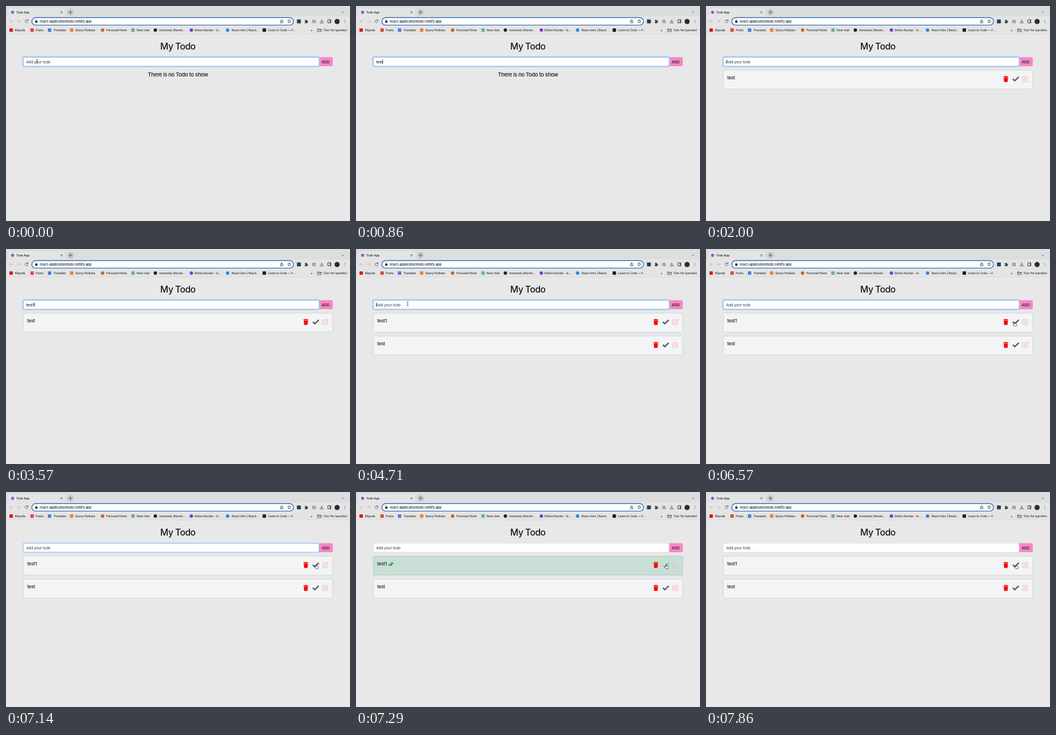
An HTML page for the animation above (8 s loop, 600 by 375 pixels).

```html
<!DOCTYPE html>
<html lang="en">
<head>
<meta charset="utf-8">
<title>Todo App</title>
<style>
html, body { margin: 0; width: 100%; height: 100%; overflow: hidden; background: #e8e8e8; }
svg { display: block; width: 600px; height: 375px; font-family: Inter, Roboto, sans-serif; fill: #14171a; }
text { white-space: pre; }
.mark { font-size: 4.95px; font-weight: 500; fill: #222427; }
.field { font-size: 6.3px; font-weight: 500; }
.line { fill: none; stroke: #3f4347; stroke-width: .8; stroke-linecap: round; stroke-linejoin: round; }
.item { font-size: 7.9px; font-weight: 500; letter-spacing: -.13px; }
</style>
</head>
<body>
<svg viewBox="0 0 600 375">
  <defs>
    <g id="trash" fill="#f50808">
      <path d="M518.8 122.8h2.4l.6-.9h2.4l.6.9h2.4v1.4h-8.4z"/>
      <path d="M519.4 124.8h7.2l-.4 6.4q-.1 1.2-1.2 1.2h-4q-1.1 0-1.2-1.2z"/>
    </g>
    <path id="tick" d="M535.1 127.1l3.5 3.2 6.9-6.6" fill="none" stroke="#5a5d60" stroke-width="2.4"/>
    <g id="pencil" fill="none" stroke="#f6a9bb" stroke-width="1" stroke-linejoin="round">
      <path d="M557 123.3h-3.4q-1.3 0-1.3 1.3v6q0 1.3 1.3 1.3h6q1.3 0 1.3-1.3v-3.2"/>
      <path d="M555.4 128.9l.4-2 4.5-4.4 1.5 1.5-4.4 4.5z"/>
    </g>
    <g id="twin" fill="none" stroke-linejoin="round">
      <path d="M0 4.2l2 2.4 5-6.3M3.4 5.6l1 1.3 5-6.3"/>
    </g>
  </defs>

  <!-- browser frame -->
  <path d="M0 0h600v18H0z" fill="#dcdddf"/>
  <path d="M0 18h600v31H0zM2 18q2 0 2-2V7q0-3 3-3h93q3 0 3 3v9q0 2 2 2z" fill="#e4e4e5"/>
  <path d="M0 49h600" stroke="#d6d6d7" stroke-width=".6"/>
  <circle cx="11.5" cy="11" r="2.7" fill="#8b5cd6"/>
  <text x="18" y="12.9" font-size="5" font-weight="500">Todo App</text>
  <circle cx="112.5" cy="11" r="5.8" fill="#c6c7ca"/>
  <g class="line">
    <path d="M95.2 9.5l3 3m0-3l-3 3M110 11h5m-2.5-2.5v5M586 10.3l1.6 1.6 1.6-1.6"/>
    <path d="M12.3 26.7H6.8m2.3-2.4l-2.4 2.4 2.4 2.4M19.3 26.7h5.5m-2.3-2.4l2.4 2.4-2.4 2.4" stroke="#b4b6b9"/>
    <path d="M38.1 25.4a2.5 2.5 0 1 0 .1 2.3M38.3 23.8v1.8h-1.8"/>
  </g>
  <rect x="45" y="20.2" width="456.5" height="13.2" rx="6.6" fill="#fff" stroke="#3a72b8" stroke-width="1.4"/>
  <rect x="51" y="26.1" width="3.8" height="3" rx=".4"/>
  <path class="line" d="M51.8 26v-1a1.1 1.1 0 0 1 2.2 0v1"/>
  <text x="59" y="28.8" font-size="5.75" font-weight="500">react-applicationtodo.netlify.app</text>
  <g class="line">
    <path d="M479.5 26h-.9v3.5h4.4V26h-.9M480.8 28v-4m-1.2 1.1l1.2-1.2 1.2 1.2"/>
    <path d="M494 23.8l.9 1.9 2 .2-1.5 1.4.4 2-1.8-1-1.8 1 .4-2-1.5-1.4 2-.2z"/>
    <path d="M534.5 25h5m-5 2h3m-3 2h2M539.2 26v3.3m0 0h-1"/>
    <path d="M550.7 24v3.6m-1.6-1.5l1.6 1.6 1.6-1.6M548.1 28.2v1.4h5.2v-1.4"/>
    <path d="M561.7 24h5v5.4h-5zM565.3 24v5.4" stroke-width="1"/>
  </g>
  <rect x="507.5" y="23.4" width="6.8" height="6.8" rx=".8" fill="#23414f"/>
  <path d="M521 25h1.5q-.3-1.5.8-1.5t.8 1.5h1.6v1.6q1.4-.2 1.4.9t-1.4.9V30H521v-1.7q1.2 0 1.2-.8t-1.2-.9z" fill="#45494d"/>
  <circle cx="577.5" cy="27" r="4.5" fill="#2b2d30"/>
  <g fill="#45494d"><circle cx="591" cy="24.6" r=".6"/><circle cx="591" cy="26.8" r=".6"/><circle cx="591" cy="29" r=".6"/></g>
  <g id="marks"></g>
  <text class="mark" x="531.5" y="43.7">»</text>
  <path class="line" d="M543.8 39.8h2.3l.8.9h3.1v4h-6.2zM543.8 41.8h6.2"/>
  <text class="mark" x="553.5" y="43.8">Tüm Yer İşaretleri</text>

  <!-- page -->
  <text x="299.8" y="75.6" text-anchor="middle" font-size="15.6" font-weight="500" letter-spacing="-.5">My Todo</text>
  <path d="M545.5 89.3h22q2.5 0 2.5 2.5v10.6q0 2.5-2.5 2.5h-22z" fill="#f886c6"/>
  <rect id="ring" x="28.5" y="87.8" width="519.2" height="18.8" rx="3.6" fill="#a9c7f3"/>
  <rect id="box" x="30.2" y="89.5" width="515.8" height="15.4" rx="2.2" fill="#fff" stroke-width=".8"/>
  <text x="550.5" y="99.5" font-size="6.45" font-weight="500">ADD</text>
  <text id="entry" class="field" x="35.2" y="99.5"></text>
  <path id="caret" d="M0 93.4v7.6" stroke="#111" stroke-width=".7"/>
  <text id="empty" x="299.9" y="122.9" text-anchor="middle" font-size="9.3" font-weight="500" letter-spacing="-.28">There is no Todo to show</text>
  <g id="cards"></g>

  <!-- pointers -->
  <path id="beam" class="line" d="M-1.4-3Q0-3 0-2.2Q0-3 1.4-3M0-2.2v5.2M-1.4 3.8Q0 3.8 0 3Q0 3.8 1.4 3.8"/>
  <path id="arrow" d="M0 0v7l1.6-1.5 1.1 2.5 1.2-.5-1.1-2.5h2.2z" fill="#111" stroke="#fff" stroke-width=".5"/>
  <path id="hand" d="M-.7.3q.7-.8 1.3 0V3l2.5.6q.9.3.8 1.2l-.5 2.8H-.6L-2.5 5q-.4-.9.5-1l1.3.8z" fill="#fff" stroke="#222" stroke-width=".65" stroke-linejoin="round"/>
</svg>
<script>
const $ = id => document.getElementById(id);
const show = (id, on) => $(id).style.display = on ? '' : 'none';

// icon centre, label start, colour, round or square, label
const marks = [
  [9, 15.5, '#e81616', 0, 'Klipoda'],
  [45.5, 52, '#dc4a3d', 0, 'Postu'],
  [76, 83, '#4a80df', 0, 'Translate'],
  [114.5, 121, '#e98338', 0, 'Query Hollows'],
  [168.5, 175.3, '#b66b34', 1, 'Personal Home'],
  [221.5, 228, '#6fae9c', 0, 'New chat'],
  [260.5, 267.2, '#202328', 1, 'monavelu (Kerem...'],
  [323.3, 328.5, '#8436cf', 1, 'Online Kurslar - İs...'],
  [386.5, 393.5, '#2f86d6', 1, 'React intro | React...'],
  [450.5, 457.2, '#181b33', 0, 'Learn to Code — F...']
];
$('marks').innerHTML = marks.map(([cx, x, color, round, label]) =>
  `<rect x="${cx - 3}" y="39" width="6" height="6" rx="${round ? 3 : .8}" fill="${color}"/>
   <text class="mark" x="${x}" y="43.8">${label}</text>`).join('');

const FPS = 7, STEPS = 56;
// [step, value]: each value holds until the next step
const typed = [[0, ''], [2, 't'], [3, 'te'], [4, 'tes'], [5, 'test'], [12, ''],
  [16, 't'], [17, 'tes'], [18, 'test'], [22, 'test1'], [26, '']];
const blink = [[0, 0], [2, 1], [9, 0], [12, 1], [21, 0], [22, 1], [30, 0],
  [33, 1], [37, 0], [40, 1], [44, 0], [47, 1], [50, 0]];
const focus = [[0, 1], [50, .4], [51, 0]];
const todos = [[0, []], [12, ['test']], [26, ['test1', 'test']]];
const checked = [[0, false], [51, true], [54, false]];
const path = [[32, 56, 95], [33, 90, 95], [35, 230, 99], [37, 420, 112],
  [39, 526, 126], [40, 535, 126.6], [42, 538, 126.8], [46, 538, 126.8], [49, 541, 126.2]];

const at = (track, n) => track.filter(k => k[0] <= n).pop()[1];

function pointer(n) {
  if (n < 2) return [54, 96];
  if (n < path[0][0]) return null;
  const i = path.findIndex(k => k[0] > n);
  if (i < 0) return path[path.length - 1].slice(1);
  const [a, ax, ay] = path[i - 1], [b, bx, by] = path[i];
  const p = (n - a) / (b - a);
  return [ax + (bx - ax) * p, ay + (by - ay) * p];
}

function card(name, i, done) {
  const check = done
    ? `<use href="#twin" transform="translate(536 124.2)" stroke="#6b7673" stroke-width="1"/>
       <use href="#twin" transform="translate(57 122.8) scale(.82)" stroke="#3f9a35" stroke-width="2"/>`
    : '<use href="#tick"/>';
  return `<g transform="translate(0 ${i * 40})">
    <rect x="30.2" y="111.9" width="539.5" height="33" rx="2.5"
      fill="${done ? '#c7dfd5' : '#f3f4f6'}" stroke="${done ? '#aabfb6' : '#cbcfd1'}" stroke-width=".8"/>
    <text class="item" x="37" y="128">${name}</text>
    <use href="#trash"/>${check}<use href="#pencil" opacity="${done ? .6 : 1}"/></g>`;
}

function draw(n) {
  const text = at(typed, n), list = at(todos, n), ring = at(focus, n);
  $('entry').textContent = text || 'Add your todo';
  $('entry').style.fill = text ? '#14171a' : '#4a4f54';
  const end = text ? $('entry').getComputedTextLength() : 0;
  $('caret').setAttribute('transform', `translate(${35.4 + end} 0)`);
  show('caret', at(blink, n));
  $('ring').style.opacity = ring;
  $('box').style.stroke = ring ? '#86b2f8' : '#dfe2e5';
  show('empty', !list.length);
  $('cards').innerHTML = list.map((name, i) => card(name, i, !i && at(checked, n))).join('');

  const pos = pointer(n);
  const kind = pos && (pos[1] < 106 ? 'beam' : pos[0] > 515 ? 'hand' : 'arrow');
  for (const id of ['beam', 'arrow', 'hand']) {
    show(id, id === kind);
    if (id === kind) $(id).setAttribute('transform', `translate(${pos})`);
  }
}

const start = performance.now();
let last = -1;
function tick() {
  const t = performance.now() - start;
  const n = Math.floor((t + 5) * FPS / 1000) % STEPS;
  if (n !== last) draw(last = n);
  requestAnimationFrame(tick);
}
tick();
</script>
</body>
</html>
```
